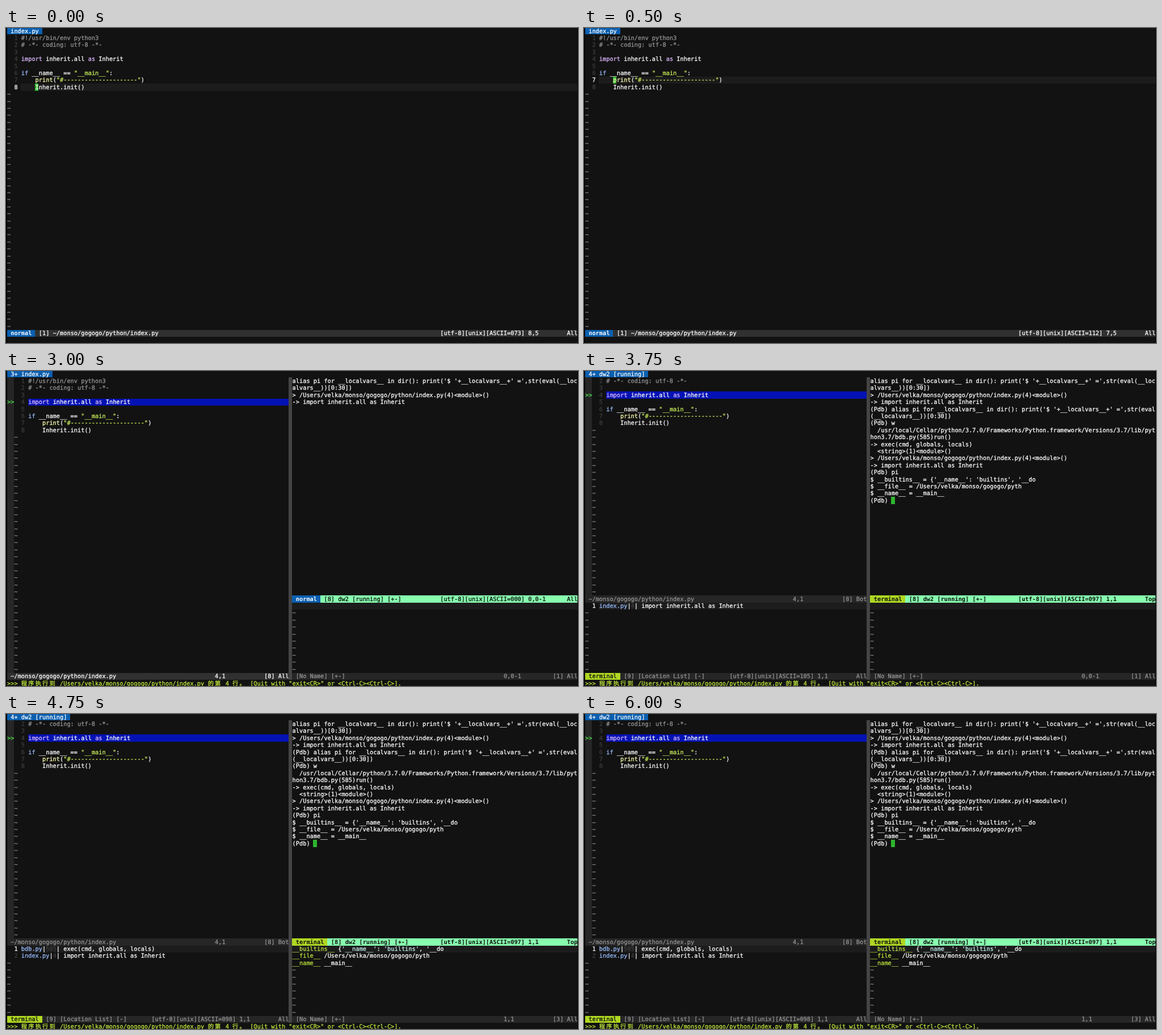
These frames come from a looping animation (1008x556 px, 8 s). An HTML page:

```html
<!DOCTYPE html>
<html lang="en">
<head>
<meta charset="utf-8">
<title>Debugger in a terminal editor</title>
<style>
html, body { margin: 0; width: 100%; height: 100%; overflow: hidden; background: #000; }
#stage { position: relative; width: 1008px; height: 556px; overflow: hidden; }
.scene { position: absolute; inset: 0; visibility: hidden; }
.scene * { position: absolute; }
.scene span {
  font: 10.3px/12.41px "DejaVu Sans Mono", "Noto Sans CJK SC", monospace;
  height: 12.41px; white-space: pre; text-rendering: geometricPrecision;
  -webkit-text-stroke: 0.3px;
}
.scene .wide { letter-spacing: 2.11px; }
.scene .bold { font-weight: bold; -webkit-text-stroke: 0; }
</style>
</head>
<body>
<div id="stage"></div>
<script>
const CW = 6.205, RH = 12.41, COLS = 162, MID = 81;
const USER = '/Users/velka', PROJECT = '/monso/gogogo/python/index.py';
const FILE = USER + PROJECT, HOME = '~' + PROJECT;
const INK = {
  white: '#fafafa', grey: '#929292', dim: '#3c3c3c', violet: '#d8b4f8', blue: '#94b8f8',
  cream: '#f8f8a8', string: '#c4ea58', lime: '#bce23c', green: '#4be34b', cyan: '#c4ecec', black: '#101010'
};
const BG = {
  base: '#121212', line: '#1c1c1c', bar: '#303030', idle: '#262626',
  tab: '#0a5fb0', mint: '#87ffaf', lime: '#afd722', cursor: '#2db52d'
};

let scene;

const cellX = col => 2 + col * CW;
const cellY = row => row * RH - 0.5;

// Backgrounds snap to whole pixels so that their edges stay crisp.
function fill(row, col, width, color, rows = 1) {
  const el = scene.appendChild(document.createElement('div'));
  const x = Math.floor(cellX(col)), y = Math.max(0, Math.floor(cellY(row)));
  el.style.left = x + 'px';
  el.style.top = y + 'px';
  el.style.width = Math.floor(cellX(col + width)) - x + 'px';
  el.style.height = Math.floor(cellY(row + rows)) - y + 'px';
  el.style.background = color;
}

function put(row, col, ink, text, cls = '') {
  const el = scene.appendChild(document.createElement('span'));
  el.className = cls;
  el.style.left = cellX(col) + 'px';
  el.style.top = cellY(row) + 'px';
  el.style.color = INK[ink];
  el.textContent = text;
}

// Takes alternating ink names and texts.
function run(row, col, ...parts) {
  for (let i = 0; i < parts.length; i += 2) {
    put(row, col, parts[i], parts[i + 1]);
    col += parts[i + 1].length;
  }
}

function tildes(from, to, col) {
  for (let r = from; r <= to; r++) put(r, col, 'grey', '~');
}

function tab(text) {
  fill(0, 0, text.length + 2, BG.tab);
  put(0, 1, 'white', text);
}

function badge(row, col, text, bg, ink) {
  fill(row, col, text.length + 2, bg);
  put(row, col + 1, ink, text, 'bold');
}

const CODE = [
  ['grey', '#!/usr/bin/env python3'],
  ['grey', '# -*- coding: utf-8 -*-'],
  [],
  ['violet', 'import', 'white', ' inherit.all ', 'violet', 'as', 'white', ' Inherit'],
  [],
  ['blue', 'if', 'white', ' __name__ == ', 'string', '"__main__"', 'white', ':'],
  ['cream', '    print', 'white', '(', 'string', '"#' + '-'.repeat(21) + '"', 'white', ')'],
  ['white', '    Inherit.init()']
];

function code(first, col, current) {
  for (let n = first; n <= CODE.length; n++) {
    const row = n - first + 1;
    put(row, col - 2, n === current ? 'white' : 'dim', String(n));
    run(row, col, ...CODE[n - 1]);
  }
}

function editor(line, ascii, cursor) {
  tab('index.py');
  fill(line, 4, COLS - 4, BG.line);
  if (cursor) fill(line, 8, 1, BG.cursor);
  code(1, 4, line);
  tildes(9, 42, 0);
  fill(43, 0, COLS, BG.bar);
  badge(43, 0, 'normal', BG.tab, 'white');
  put(43, 9, 'white', '[1] ' + HOME);
  put(43, 123, 'white', `[utf-8][unix][ASCII=${ascii}] ${line},5`);
  put(43, 159, 'white', 'All');
}

function source(first, statusRow, ink, bar, extent) {
  fill(1, 0, 2, BG.idle, statusRow - 1);
  fill(5 - first, 6, 74, '#0412b4');
  put(5 - first, 0, 'green', '>>');
  code(first, 6);
  tildes(10 - first, statusRow - 1, 2);
  fill(statusRow, 0, 80, bar);
  put(statusRow, 1, ink, HOME);
  put(statusRow, 59, ink, '4,1');
  put(statusRow, 73, ink, '[8] ' + extent);
}

function lowerRight(pos, count) {
  fill(33, MID, MID, BG.line);
  fill(43, MID, MID, BG.idle);
  put(43, 82, 'grey', '[No Name] [+-]');
  put(43, 141, 'grey', pos);
  put(43, 155, 'grey', `[${count}] All`);
}

function message() {
  put(44, 0, 'lime', '>>>');
  put(44, 4, 'lime', '程序执行到', 'wide');
  put(44, 15, 'lime', FILE);
  put(44, 57, 'lime', '的第', 'wide');
  put(44, 62, 'lime', '4');
  put(44, 64, 'lime', '行。', 'wide');
  put(44, 69, 'lime', '[Quit with "exit<CR>" or <Ctrl-C><Ctrl-C>].');
}

const START = [
  "alias pi for __localvars__ in dir(): print('$ '+__localvars__+' =',str(eval(__loc",
  'alvars__))[0:30])',
  `> ${FILE}(4)<module>()`,
  '-> import inherit.all as Inherit'
];
const SESSION = [
  ...START,
  "(Pdb) alias pi for __localvars__ in dir(): print('$ '+__localvars__+' =',str(eval",
  '(__localvars__))[0:30])',
  '(Pdb) w',
  '  /usr/local/Cellar/python/3.7.0/Frameworks/Python.framework/Versions/3.7/lib/pyt',
  'hon3.7/bdb.py(585)run()',
  '-> exec(cmd, globals, locals)',
  '  <string>(1)<module>()',
  ...START.slice(2),
  '(Pdb) pi',
  "$ __builtins__ = {'__name__': 'builtins', '__do",
  `$ __file__ = ${USER}/monso/gogogo/pyth`,
  '$ __name__ = __main__',
  '(Pdb) '
];

function terminal(lines) {
  lines.forEach((text, i) => put(i + 1, MID, 'white', text));
  fill(32, MID, MID, BG.mint);
}

function divider() {
  fill(1, 80, 1, '#444', 43);
}

function launch() {
  tab('3+ index.py');
  source(1, 43, 'white', BG.bar, 'All');
  terminal(START);
  badge(32, MID, 'normal', BG.tab, 'white');
  put(32, 90, 'black', '[8] dw2 [running] [+-]');
  put(32, 123, 'black', '[utf-8][unix][ASCII=000] 0,0-1');
  put(32, 159, 'black', 'All');
  lowerRight('0,0-1', 1);
  tildes(34, 42, MID);
  divider();
  message();
}

function debug(filled, ascii, pos, count) {
  tab('4+ dw2 [running]');
  source(2, 32, 'grey', BG.idle, 'Bot');
  terminal(SESSION);
  fill(18, 87, 1, BG.cursor);
  badge(32, MID, 'terminal', BG.lime, 'black');
  put(32, 92, 'black', '[8] dw2 [running] [+-]', 'bold');
  put(32, 123, 'black', '[utf-8][unix][ASCII=097] 1,1', 'bold');
  put(32, 159, 'black', 'Top', 'bold');

  fill(33, 4, 76, BG.line);
  const stack = [['index.py', '4', 'import inherit.all as Inherit']];
  if (filled) stack.unshift(['bdb.py', '585', 'exec(cmd, globals, locals)']);
  stack.forEach(([file, line, text], i) => {
    put(33 + i, 2, i ? 'dim' : 'white', String(i + 1));
    run(33 + i, 4, 'blue', file, 'white', '|', 'dim', line, 'white', '| ' + text);
  });
  tildes(33 + stack.length, 42, 0);
  fill(43, 0, 80, BG.idle);
  fill(43, 0, 10, BG.lime);
  put(43, 1, 'black', 'terminal');
  put(43, 11, 'grey', '[9] [Location List] [-]');
  put(43, 41, 'grey', `[utf-8][unix][ASCII=${ascii}] 1,1`);
  put(43, 77, 'grey', 'All');

  lowerRight(pos, count);
  if (filled) {
    run(33, MID, 'lime', '__builtins__', 'white', ' {', 'cyan', "'__name__'", 'white', ': ',
      'cyan', "'builtins'", 'white', ", '__do");
    run(34, MID, 'lime', '__file__', 'white', ` ${USER}/monso/gogogo/pyth`);
    run(35, MID, 'lime', '__name__', 'white', ' __main__');
  }
  tildes(filled ? 36 : 34, 42, MID);
  divider();
  message();
}

const LOOP = 8000;
const timeline = [
  [0, () => editor(8, '073', true)],
  [500, () => editor(7, '112', true)],
  [2500, () => editor(7, '112', false)],
  [3000, launch],
  [3750, () => debug(false, '105', '0,0-1', 1)],
  [4000, () => debug(true, '105', '0,0-1', 1)],
  [4750, () => debug(true, '098', '1,1', 3)]
].map(([start, draw]) => {
  scene = document.getElementById('stage').appendChild(document.createElement('div'));
  scene.className = 'scene';
  fill(0, 0, COLS, BG.base, 45);
  draw();
  return { start, el: scene };
});

let shown;
const origin = performance.now();
function tick() {
  const t = (performance.now() - origin) % LOOP;
  const next = timeline.filter(s => s.start <= t).pop().el;
  if (next !== shown) {
    if (shown) shown.style.visibility = 'hidden';
    next.style.visibility = 'visible';
    shown = next;
  }
  requestAnimationFrame(tick);
}
tick();
</script>
</body>
</html>
```
